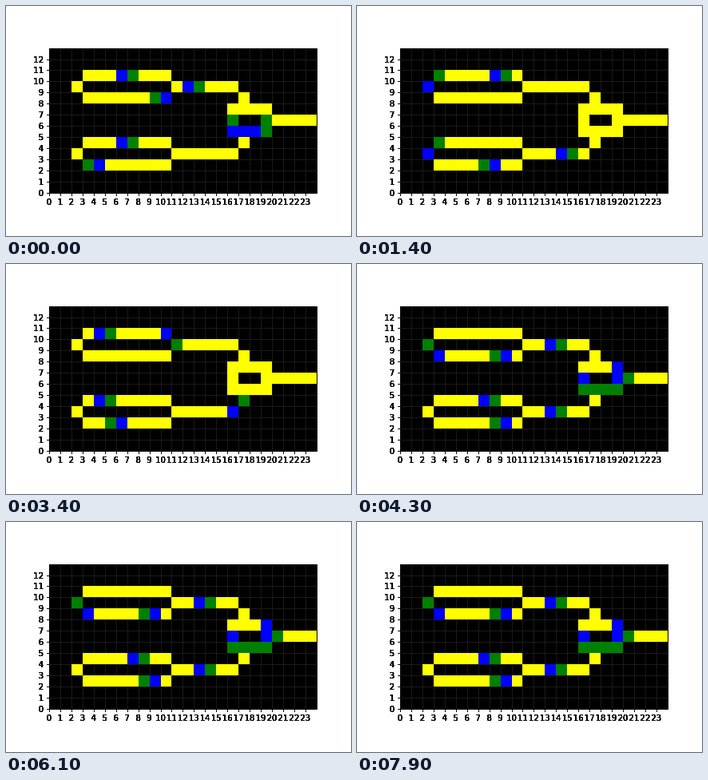
Recreate the animation shown at these times as an HTML page with a canvas. Size 432 by 288 pixels, loop 8000 ms.

```html
<!DOCTYPE html>
<html>
<head>
<meta charset="utf-8">
<style>
html, body { margin: 0; width: 100%; height: 100%; overflow: hidden; background: #fff; }
canvas { display: block; }
</style>
</head>
<body>
<canvas id="stage" width="432" height="288"></canvas>
<script>
// Wireworld: two clock loops feeding an XOR gate
const COLS = 24, ROWS = 13, CELL = 13.95;
const STEP = 100, LOOP = 8000, PERIOD = 18;
const EMPTY = 0, WIRE = 1, HEAD = 2, TAIL = 3;
const COLORS = ['#000', '#ff0', '#008000', '#00f'];
const ctx = document.getElementById('stage').getContext('2d');

const px = c => Math.round(54 + c * CELL);
const py = r => Math.round(233.9 - r * CELL);
const at = (c, r) => r * COLS + c;

function startState() {
  const grid = new Array(COLS * ROWS).fill(EMPTY);
  const run = (state, r, from, to = from) => {
    for (let c = from; c <= to; c++) grid[at(c, r)] = state;
  };
  for (const mid of [3, 9]) {
    run(WIRE, mid - 1, 3, 10);
    run(WIRE, mid + 1, 3, 10);
    run(WIRE, mid, 2);
    run(WIRE, mid, 11, 16);
  }
  run(WIRE, 8, 17);
  run(WIRE, 4, 17);
  run(WIRE, 7, 16, 19);
  run(WIRE, 6, 19, 23);
  run(TAIL, 5, 16, 18);

  for (const [c, r] of [[7, 10], [13, 9], [9, 8], [7, 4], [3, 2], [16, 6], [19, 6], [19, 5]])
    run(HEAD, r, c);
  for (const [c, r] of [[6, 10], [12, 9], [10, 8], [6, 4], [4, 2]])
    run(TAIL, r, c);
  return grid;
}

function headsNear(grid, c, r) {
  let n = 0;
  for (let y = Math.max(0, r - 1); y <= Math.min(ROWS - 1, r + 1); y++)
    for (let x = Math.max(0, c - 1); x <= Math.min(COLS - 1, c + 1); x++)
      if (grid[at(x, y)] === HEAD) n++;
  return n;
}

function evolve(grid) {
  return grid.map((state, i) => {
    if (state === HEAD) return TAIL;
    if (state === TAIL) return WIRE;
    if (state === EMPTY) return EMPTY;
    const n = headsNear(grid, i % COLS, Math.floor(i / COLS));
    return n === 1 || n === 2 ? HEAD : WIRE;
  });
}

const states = [startState()];
while (states.length < PERIOD) states.push(evolve(states[states.length - 1]));

function box(color, x0, y0, x1, y1) {
  ctx.fillStyle = color;
  ctx.fillRect(x0, y0, x1 - x0, y1 - y0);
}

// Repeated drawing thickens the antialiased edges
function label(text, x, y, align) {
  ctx.textAlign = align;
  for (let i = 0; i < 8; i++) ctx.fillText(text, x, y);
}

function drawAxes() {
  ctx.font = '10px "DejaVu Sans", sans-serif';
  for (let c = 0; c < COLS; c++) {
    box('#000', px(c), 234, px(c) + 1, 238);
    label(c, 54 + c * CELL, 249, 'center');
  }
  for (let r = 0; r < ROWS; r++) {
    box('#000', 51, py(r), 54, py(r) + 1);
    label(r, 47, py(r) + 4, 'right');
  }
}

function drawGrid(grid) {
  const left = px(0), right = px(COLS), top = py(ROWS), bottom = py(0);
  box('#000', left, top, right + 1, bottom + 1);
  for (let c = 1; c < COLS; c++) box('#1a1a1a', px(c), top + 1, px(c) + 1, bottom);
  for (let r = 1; r < ROWS; r++) box('#1a1a1a', left + 1, py(r), right, py(r) + 1);
  grid.forEach((state, i) => {
    if (state === EMPTY) return;
    const c = i % COLS, r = Math.floor(i / COLS);
    box(COLORS[state], px(c), py(r + 1), px(c + 1), py(r));
  });
}

const start = performance.now();
function frame() {
  const t = Math.max(0, performance.now() - start) % LOOP;
  drawGrid(states[Math.floor(t / STEP) % PERIOD]);
  requestAnimationFrame(frame);
}
drawAxes();
frame();
</script>
</body>
</html>
```
